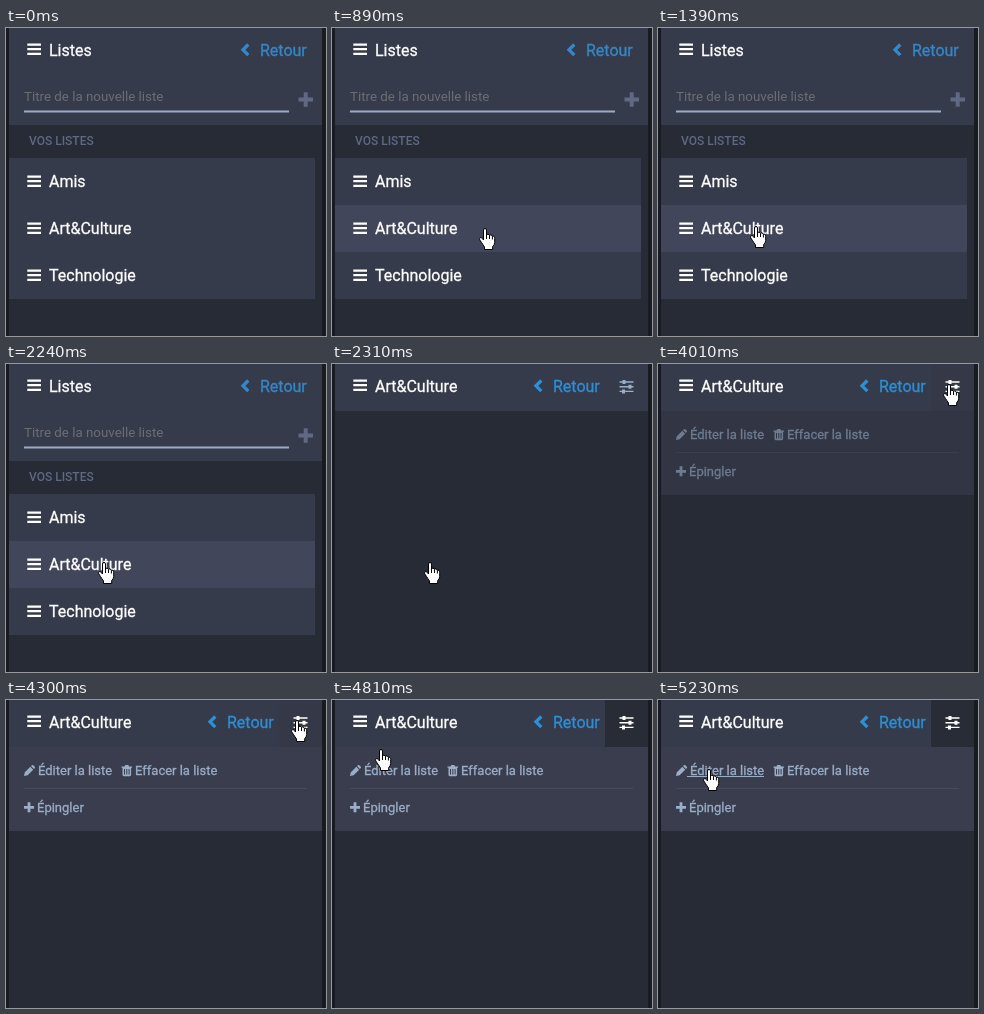
Recreate the animation shown at these times as an HTML page. Size 320 by 308 pixels, loop 6.69 s.

```html
<!DOCTYPE html>
<html lang="fr">
<head>
<meta charset="utf-8">
<title>Listes</title>
<style>
  html, body { margin: 0; width: 100%; height: 100%; overflow: hidden; background: #191b22; }
  svg { display: block; width: 100vw; height: 100vh; color: #fff; }
  text {
    font: 400 16px Roboto, sans-serif; white-space: pre;
    fill: currentColor; stroke: currentColor; stroke-width: .3;
  }
  .bar { fill: #363b4b; }
  .hint { font-size: 13.333px; color: #6c6d75; stroke: none; }
  .sub { font-size: 12px; font-weight: 500; color: #606984; stroke: none; }
  .small { color: #9baec8; }
  .small text { font-size: 13px; }
  .small path { fill: currentColor; }
  #tune { color: #9baec8; }
  #tune .bg { fill: none; }
  #tune.on { color: #fff; }
  #tune.on .bg { fill: #282c37; }
  #tune.on.hover .bg { fill: #343847; }
</style>
</head>
<body>
<svg viewBox="0 0 320 308" preserveAspectRatio="none">
  <defs>
    <path id="menu" fill="none" stroke="#fff" stroke-width="2.3" d="M21.300 -4.600h13.700M21.300 0h13.700M21.300 4.600h13.700"/>
    <g id="back">
      <path d="M8.500 16.500L3.200 21.800L8.500 27.100" fill="none" stroke="currentColor" stroke-width="3.3"/>
      <text x="20.2" y="28">Retour</text>
    </g>
  </defs>
  <rect width="320" height="308" fill="#191b22"/>
  <rect x="3" width="313" height="308" fill="#272b35"/>

  <g id="lists">
    <rect class="bar" x="3" width="313" height="97"/>
    <use href="#menu" y="21.2"/>
    <text x="43" y="28">Listes</text>
    <use href="#back" x="233.800" color="#3588c8"/>
    <text class="hint" x="18" y="73">Titre de la nouvelle liste</text>
    <rect x="18" y="82.5" width="265" height="2" fill="#9baec8"/>
    <path d="M292.5 71.5h14.5M299.7 64.3v14.4" stroke="#606984" stroke-width="4"/>
    <text class="sub" x="23" y="117">VOS LISTES</text>
    <g id="rows"></g>
  </g>

  <g id="column">
    <rect class="bar" x="3" width="313" height="47"/>
    <use href="#menu" y="21.2"/>
    <text x="43" y="28">Art&amp;Culture</text>
    <use href="#back" x="200.800" color="#2b90d9"/>
    <g id="tune">
      <rect class="bg" x="273" width="43" height="47"/>
      <path d="M287.5 18h14M287.5 22.7h14M287.5 27.4h14" stroke="currentColor" stroke-width="1.4"/>
      <path d="M292 16v4M298 20.7v4M291.5 25.4v4" stroke="currentColor" stroke-width="3"/>
    </g>
    <g id="panel" class="small">
      <rect x="3" y="47" width="313" height="84" fill="#393d4e"/>
      <path d="M18 76l.7-3.6 5.6-5.6 2.9 2.9-5.6 5.6zM25 66.100l.9-.9q.7-.6 1.400 0l1.500 1.500q.6.7 0 1.400l-.9.9z"/>
      <text x="32" y="75">Éditer la liste</text>
      <rect id="line" x="29" y="76" width="77" height="1" fill="#9baec8"/>
      <path fill-rule="evenodd" d="M115.500 66.500h3l.8-1.500h3l.8 1.500h3v1.300h-1v7q0 1.400-1.200 1.400h-6.200q-1.200 0-1.200-1.400v-7h-1z
        M118 69v5.500h1v-5.500zM120.300 69v5.500h1v-5.500zM122.600 69v5.500h1v-5.500z"/>
      <text x="129" y="75">Effacer la liste</text>
      <rect x="18" y="88" width="283" height="1" fill="#464b5d"/>
      <path d="M18 105.900h3.600v-3.600h2.800v3.600h3.600v2.800h-3.600v3.600h-2.800v-3.600h-3.600z"/>
      <text x="31" y="112">Épingler</text>
    </g>
  </g>

  <g id="hand" stroke="#000" stroke-linejoin="round">
    <path fill="#fff" d="M4.500 2Q4.500 .5 6 .5Q7.500 .5 7.500 2V7Q7.800 6 9 6.200Q10.300 6.400 10.500 7.500Q11 6.700 12 7
      Q13.300 7.300 13.400 8.500Q14 7.800 15 8.400Q15.700 9 15.700 10.500V14.500Q15.500 17 13.700 18.500V21.500H5.500V19
      Q3.500 16 2.500 14.500L.7 11.800Q.2 10.300 1.300 9.700Q2.500 9.400 3.300 10.500L4.500 12Z"/>
    <path fill="none" d="M7.500 7v4M10.500 7.500v3.500M13.400 8.500v3"/>
  </g>
</svg>
<script>
  const LOOP = 6690, SAMPLE = 70;
  const $ = id => document.getElementById(id);
  const show = (el, on) => el.setAttribute('visibility', on ? 'inherit' : 'hidden');
  const smooth = s => s * s * (3 - 2 * s);
  const easeOut = s => 1 - (1 - s) ** 2.34;

  $('rows').innerHTML = ['Amis', 'Art&amp;Culture', 'Technologie'].map((name, i) => {
    const y = 130 + 47 * i;
    return `<rect class="bar" x="3" y="${y}" width="306" height="47"/>
      <use href="#menu" y="${y + 23.2}"/><text x="43" y="${y + 29}">${name}</text>`;
  }).join('');
  const row = $('rows').querySelectorAll('rect')[1];

  // Pointer moves: start, sample count, ends, easing per axis
  const moves = [
    { at: 540, n: 10, from: [302, 205], to: [94, 198], lead: 1, ex: easeOut, ey: easeOut },
    { at: 1320, n: 1, from: [94, 198], to: [92, 198], ex: smooth, ey: smooth },
    { at: 2690, n: 8, from: [92, 198], to: [285, 20], ex: smooth, ey: smooth },
    { at: 4380, n: 4, from: [285, 20], to: [43, 48], ex: smooth, ey: s => s * s },
    { at: 4740, n: 7, from: [43, 48], to: [45, 69], ex: smooth, ey: smooth }
  ];

  function pointer(t) {
    const m = moves.findLast(m => t >= m.at + SAMPLE);
    if (!m) return null;
    const lead = m.lead || 0;
    const k = Math.min(m.n, Math.floor((t - m.at) / SAMPLE));
    const s = (k - lead) / (m.n - lead);
    const mix = (i, ease) => Math.round(m.from[i] + (m.to[i] - m.from[i]) * ease(s));
    return [mix(0, m.ex), mix(1, m.ey)];
  }

  function draw(t) {
    const p = pointer(t), opened = t >= 2310, panel = t >= 3940;
    show($('hand'), p);
    if (p) $('hand').setAttribute('transform', `translate(${p})`);
    show($('lists'), !opened);
    show($('column'), opened);
    row.style.fill = p && !opened ? '#42465a' : '';
    show($('panel'), panel);
    const fade = Math.floor((t - 3940) / SAMPLE) * SAMPLE / 300;
    $('panel').style.opacity = Math.min(1, 0.5 + Math.max(0, fade) / 2);
    $('tune').classList.toggle('on', panel);
    $('tune').classList.toggle('hover', panel && p[0] > 267);
    show($('line'), panel && p[0] < 100 && p[1] >= 61);
  }

  const start = performance.now();
  (function tick() {
    draw((performance.now() - start) % LOOP);
    requestAnimationFrame(tick);
  })();
</script>
</body>
</html>
```
